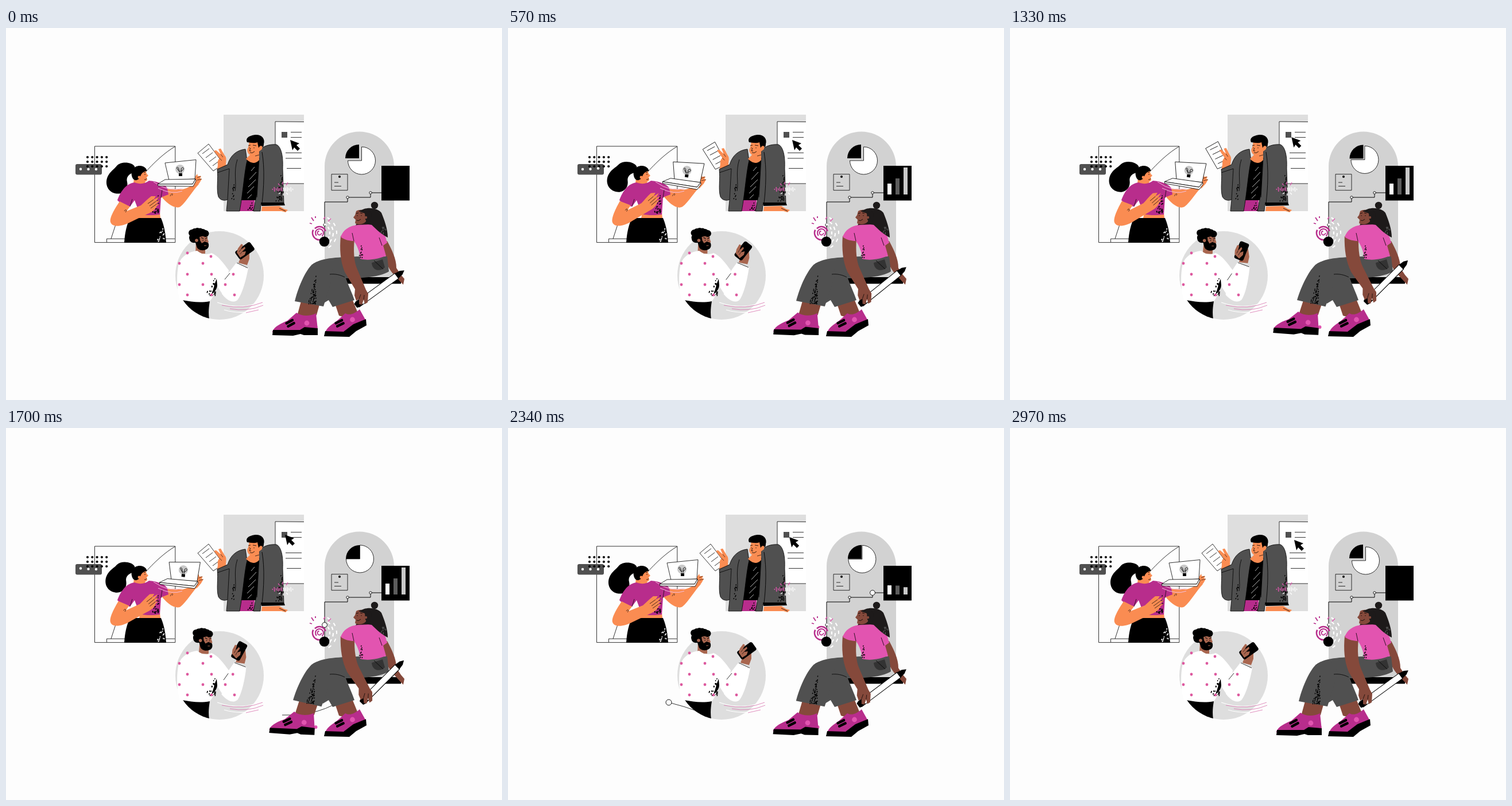
Animation, 864 px wide and 648 px high, one loop 3000 ms. Source, as an HTML page with a canvas:

```html
<!DOCTYPE html>
<html lang="en">
<head>
<meta charset="utf-8">
<title>Team at work</title>
<style>
html, body { margin: 0; width: 100%; height: 100%; overflow: hidden; background: #fdfdfd; }
canvas { display: block; width: 864px; height: 648px; }
</style>
</head>
<body>
<canvas id="stage" width="864" height="648"></canvas>
<script>
const ctx = document.getElementById('stage').getContext('2d');
const LOOP = 3000;
const BG = '#fdfdfd', GREY = '#d2d2d2', PALE = '#dedede', DARK = '#505050', INK = '#000', WHITE = '#fff';
const PLUM = '#b82d8c', PINK = '#e254b0', PEACH = '#fa8c52', TAN = '#a9664f', BROWN = '#85493b', HAIR = '#1d1a1a';
const paths = new Map();

function path(d) {
  if (!paths.has(d)) paths.set(d, new Path2D(d));
  return paths.get(d);
}
function fill(d, color) {
  ctx.fillStyle = color;
  ctx.fill(path(d));
}
function strokeWith(p, color, width) {
  ctx.strokeStyle = color;
  ctx.lineWidth = width;
  ctx.stroke(p);
}
function line(d, color = INK, width = 0.8) {
  strokeWith(path(d), color, width);
}
function shape(d, color, width = 0.8) {
  fill(d, color);
  line(d, INK, width);
}
// For outlines that change from frame to frame.
function freeShape(d, color, edge) {
  const p = new Path2D(d);
  ctx.fillStyle = color;
  ctx.fill(p);
  if (edge) strokeWith(p, INK, edge);
}
function dot(x, y, r, color, outline) {
  ctx.beginPath();
  ctx.arc(x, y, r, 0, 7);
  ctx.fillStyle = color;
  ctx.fill();
  if (outline) {
    ctx.strokeStyle = INK;
    ctx.lineWidth = 0.9;
    ctx.stroke();
  }
}
function rect(x, y, w, h, color) {
  ctx.fillStyle = color;
  ctx.fillRect(x, y, w, h);
}
function posed(dx, dy, deg, px, py, draw) {
  ctx.save();
  ctx.translate(px + dx, py + dy);
  ctx.rotate(deg * Math.PI / 180);
  ctx.translate(-px, -py);
  draw();
  ctx.restore();
}

const ease = x => x * x * (3 - 2 * x);
const ramp = (t, from, len) => Math.min(1, Math.max(0, (t - from) / len));
const upDown = (t, a, b, c, d) => ease(ramp(t, a, b - a)) - ease(ramp(t, c, d - c));
function bump(t, mid, half) {
  const d = Math.abs(t - mid);
  return d < half ? (1 + Math.cos(Math.PI * d / half)) / 2 : 0;
}

// Grains gather at the bottom right of a slanted strip.
function grains(x, y, w, h, n, lean, seed, color = INK) {
  ctx.fillStyle = color;
  for (let i = 0; i < n; i++) {
    seed = (seed * 16807) % 2147483647;
    const u = seed / 2147483647;
    seed = (seed * 16807) % 2147483647;
    const v = Math.sqrt(seed / 2147483647);
    ctx.beginPath();
    ctx.ellipse(x + w * (1 - u * v) + lean * v, y + h * v, 0.8, 1.2, 0.4, 0, 7);
    ctx.fill();
  }
}

// A stroke that runs in along its path and then runs out.
function runner(d, len, t, start, mid, end) {
  if (t <= start || t >= end) return;
  const head = ramp(t, start, mid - start) * len;
  const tail = ramp(t, mid + 40, end - mid - 40) * len;
  ctx.setLineDash([head - tail, len * 3]);
  ctx.lineDashOffset = -tail;
  line(d);
  ctx.setLineDash([]);
}

function threads(t) {
  runner('M505 223.5Q532 218 570 219.5', 67, t, 760, 930, 1140);
  const s = upDown(t, 2060, 2260, 2420, 2640);
  if (s > 0.01) {
    const x = 330 - 50 * s, y = 494 - 16 * s;
    strokeWith(new Path2D(`M${x} ${y}Q308 485 332 494`), INK, 0.8);
    dot(x, y, 5 * s, BG, true);
  }
}

function laptop() {
  shape('M277 235L331 229.5L329 263L284 265Z', WHITE);
  shape('M277 264L330 263L325 272L264 272Z', WHITE);
  shape('M264 272L325 272L330 263L331 266L326 276L265 275Z', WHITE);
  dot(303, 246, 8, '#c8c8c8');
  line('M303 252L299 246C295 243 300 240 301 246C302 252 306 250 305 245C309 240 312 247 306 248L305 252', INK, 0.9);
  rect(301, 253, 6, 5, INK);
}

function laptopWoman(t) {
  const k = upDown(t, 20, 500, 1450, 2100);
  line('M154.5 206H294.8V373.6H154.5ZM294.5 206.5C262 225 214 278 199 318L183 367M175.5 373V367.2H294');
  ctx.beginPath();
  ctx.roundRect(121, 237, 46, 18.5, 3);
  ctx.fillStyle = DARK;
  ctx.fill();
  for (let i = 0; i < 15; i++) dot(142 + i % 5 * 8.3, 225 + Math.floor(i / 5) * 8, 2.1, INK);
  for (let i = 0; i < 3; i++) {
    const lift = bump(t % 1500, 200 + i * 180, 260);
    dot(130 + i * 13.5, 246 - lift * 1.5, 2.2, WHITE);
  }

  posed(0, 0, 6 * k, 222, 244, () =>
    fill('M224 241C219 233 200 232 193 240C187 248 177 252 175 267C174 283 188 291 200 288C209 285 213 277 211 268C209 261 213 254 224 251Z', INK));
  fill('M216 331H270C276 345 278 360 279 374H206C207 355 211 341 216 331Z', INK);
  grains(258, 336, 14, 36, 18, 5, 41, WHITE);
  fill('M234 322H268L269 331H232Z', PEACH);

  posed(4 * k, 1 * k, 0, 0, 0, () => {
    fill('M328 271L326 264L333 254L334 258L340 258L338 262L341 263L337 270L329 279Z', PEACH);
    line('M333 261L339 258M333 265L341 263', INK, 0.6);
  });
  posed(0, 0, 1.5 * k, 293, 310, () => {
    fill('M270 288L282 280L307 281C316 279 324 275 328 269L336 272C326 282 314 303 304 311C294 317 279 304 270 293Z', PEACH);
    line('M286 293C288 287 292 288 289 292', INK, 0.6);
  });

  fill('M223 258L243 260L242 272L250 268L238 277L222 272Z', PEACH);
  fill('M224 269C209 271 200 284 194 300C201 307 208 310 216 311L224 300L233 324C245 327 258 326 268 325L270 295L283 290L281 279C276 271 262 267 249 266C242 271 234 273 224 269Z', PLUM);
  grains(252, 290, 14, 33, 32, 0, 17);
  line('M216 311L220 298M270 296L272 282', INK, 0.7);
  line('M257 268Q284 287 308 279M265 279Q290 291 307 284', '#f4bddd', 1);

  fill('M229 246L243 247L245 254L248 257L245 260L246 265C243 269 236 270 230 268L223 264Z', PEACH);
  fill('M219 257C217 246 225 240 233 240C241 240 246 246 245 249C239 250 235 254 234 259C229 268 221 267 219 257Z', INK);
  dot(232, 260, 2.4, PEACH);
  line('M240 252L243 251M241 255H243M241 264Q244 265 245 262', INK, 0.8);

  posed(0, 0, -5 * k, 190, 338, () => {
    fill('M198 302C190 314 180 330 182 338C185 348 202 346 217 338L246 324C255 321 261 315 262 311L267 306L261 307L268 300L261 302L267 294L257 299L261 293L253 293C246 298 241 304 235 309L210 319L216 311Z', PEACH);
    line('M257 299L247 306M261 302L250 310M262 307L252 314M206 319C208 315 212 317 208 321', INK, 0.7);
  });

  posed(5 * k, 1 * k, 9 * k, 298, 270, laptop);
}

function paper() {
  shape('M353 202L379 237L361 249L334 218Z', WHITE);
  for (let i = 0; i < 4; i++) {
    const x = 342 + i * 6, y = 219 + i * 7;
    line(`M${x} ${y}L${x + 12} ${y - 9}`);
  }
}

function burst() {
  for (let i = 0; i < 12; i++) {
    const x = 464 + i * 3.2, h = 1 + 3 * Math.abs(Math.sin(i * 1.7));
    line(`M${x} ${281 - h}L${x + 0.6} ${281 + h}`, i < 6 ? PINK : WHITE, 1.4);
  }
  line('M474 271L477 274M482 268V273M491 269L488 274', PINK, 1.3);
  line('M475 289L478 287M483 292V288M491 290L488 287', WHITE, 1.3);
}

function coatMan(t) {
  const k = bump(t, 970, 660);
  rect(379, 151, 140, 168, PALE);
  rect(469, 163, 50, 108, WHITE);
  line('M519 163.5L469 163V271H519M496 181.5H515M496 190.5H515M487 217.5H515M487 227H515M489 244.5H514');
  rect(480, 181, 10, 10, DARK);
  const c = upDown(t, 1050, 1600, 1800, 2950);
  posed(-9 * c, -9 * c, 0, 0, 0, () =>
    fill('M495 195L511 201L506 204L512 210L508 214L502 208L499 213Z', INK));

  posed(5 * k, -3 * k, 26 * k, 372, 238, paper);
  posed(2 * k, -2 * k, 7 * k, 376, 243, () => {
    fill('M368 247L369 238C368 232 370 229 372 227L362 214L366 213L374 220L370 211L374 210L381 222C385 226 383 232 383 238L388 243L374 252Z', PEACH);
    line('M372 227L376 231M374 220L378 225', INK, 0.6);
  });

  fill('M408 300H433L432 319H405Z', PLUM);
  grains(420, 301, 10, 17, 12, 0, 7);
  fill('M414 229L441 229L439 300H407Z', INK);
  line('M427 249L433 242M424 264L436 251M422 277L435 264M420 288L432 276M421 297L428 290', WHITE, 0.7);
  shape('M417 211C401 213 391 222 386 238L368 246C370 263 366 281 370 294C374 301 381 301 386 299L384 319H407C413 286 415 252 420 231Z', DARK);
  line('M368 252L389 245L386 299M403 229C396 250 402 270 399 284', INK, 0.8);
  grains(392, 258, 6, 42, 12, 0, 93);
  shape('M441 213C448 206 458 202 471 203C480 207 483 225 482 245L484 306L444 307L443 319H431L437 288Z', DARK);
  line('M446 216C451 245 449 280 446 305M441 226L437 295', INK, 0.9);
  grains(470, 244, 11, 58, 38, 0, 65);
  fill('M446 311L476 310L484 315L491 317L487 321L480 319H445Z', PEACH);
  fill('M444 304L484 304L486 309L445 310Z', INK);
  line('M476 314L487 319', INK, 0.8);
  burst();

  posed(0, 1, 0, 0, 0, () => {
    fill('M424 196L441 197L447 203L446 210L441 214L441 229C433 238 424 233 418 227L425 220C420 217 419 211 422 207Z', PEACH);
    fill('M420 198C416 189 427 186 434 185C445 184 452 192 449 201C449 206 447 208 446 205C443 203 441 206 440 208L438 198C431 201 424 198 420 198Z', INK);
    line('M422 204L426 203M430 203L436 204M424 207V208.5M432 207V208.5M426 208L424 213H427M425 216Q429 218 433 214', INK, 0.8);
    line('M441 220L434 222', INK, 0.7);
  });
}

function phoneMan(t) {
  const arm = upDown(t, 0, 1150, 1400, 2400);
  const head = upDown(t, 500, 950, 1800, 2300);
  dot(372, 431, 77, PALE);

  posed(6 * head, 0.5 * head, 2 * head, 341, 388, () => {
    fill('M331 370L347 377L347 393L330 393Z', TAN);
    fill('M333 361L350 360L351 367L353 373L350 375L349 380L333 380Z', TAN);
    for (let i = 0; i < 6; i++) dot(324 + i * 4.7, 357 - 3 * Math.sin(i * 0.7), 6, INK);
    dot(325, 365, 6, INK);
    fill('M320 364C318 371 323 375 330 374L332 380C333 386 341 389 348 386C354 384 354 377 352 374L346 372L341 375L338 370L337 364L349 361L344 355L322 353Z', INK);
    dot(332, 370, 2.8, TAN);
    line('M340 365L344 367M347 367L351 365M343 369V370.5M348 369V370.5', INK, 1);
    line('M345 379H349', TAN, 1);
  });

  fill('M333 388C317 390 306 398 301 410C296 432 298 460 303 475L309 477C325 481 343 481 354 478C360 469 365 460 368 450L380 468L388 422C379 410 369 396 358 392C348 396 340 394 333 388Z', WHITE);
  ctx.save();
  ctx.clip(path('M372 354A77 77 0 0 1 372 508A77 77 0 0 1 372 354Z'));
  fill('M307 474C323 477 339 479 355 476C353 488 352 500 355 512H307Z', INK);
  ctx.restore();
  grains(347, 434, 18, 32, 36, 0, 77);
  fill('M367 437C363 445 362 454 358 464C364 460 368 453 368 448Z', INK);

  posed(0, 0, -5 * arm, 395, 468, () => {
    fill('M380 436L402 408L422 418C418 440 411 464 403 474C395 480 385 475 376 463Z', WHITE);
    line('M381 438L390 427M402 409L421 418', INK, 0.8);
  });
  const pts = [[316, 392], [357, 398], [302, 410], [343, 410], [316, 429], [358, 429], [302, 447], [343, 447], [382, 447], [316, 465], [358, 465], [398, 465]];
  for (const [x, y] of pts) dot(x, y, 2.4, '#dd5a9f');
  dot(396 - arm, 429, 2.4, '#dd5a9f');

  posed(-6 * arm, -2 * arm, -8 * arm, 412, 410, () =>
    fill('M405 409L409 399L402 390L407 382L416 390L424 388L424 402L420 413Z', TAN));
  posed(-12.5 * arm, 0.5 * arm, -33 * arm, 416, 388, () => {
    ctx.save();
    ctx.translate(416, 388);
    ctx.rotate(-0.62);
    ctx.beginPath();
    ctx.roundRect(-16, -8.5, 32, 17, 3.5);
    ctx.fillStyle = INK;
    ctx.fill();
    ctx.restore();
  });
  posed(-9 * arm, 1 * arm, -12 * arm, 412, 400, () => {
    fill('M408 400L402 391L404 384L410 376L413 378L409 386L416 381L417 384L411 390L418 389L416 395Z', TAN);
    line('M409 386L406 390M411 390L408 394', INK, 0.6);
  });

  line('M368 478Q410 493 448 475M380 491Q414 501 447 488', WHITE, 1.1);
  line('M376 483Q415 491 447 478M390 489Q420 495 448 483M418 496L440 491', '#d772ac', 0.8);
}

function board(t) {
  fill('M555 440V241A60.5 60.5 0 0 1 676 241V440Z', GREY);
  runner('M592 468Q550 502 481 500', 120, t, 1440, 1690, 1980);
  const p = upDown(t, 1050, 1600, 2250, 2650);
  const x = 619.5 - 3 * p, y = 231 - 3 * p;
  freeShape(`M${x} ${y}V${y - 24}A24 24 0 1 1 ${x - 24} ${y}Z`, WHITE, 0.8);
  const q = 615 + p, r = 227 + p;
  freeShape(`M${q} ${r}V${r - 24}A24 24 0 0 0 ${q - 24} ${r}Z`, INK);

  line('M567 254.7H595V282.7H567ZM572 269H579M572 275.5H584');
  dot(581, 259, 2, INK);
  line('M555 364V303H595V295H635V287H654', INK, 1);
  const nodes = [[555, 343], [595, 295], [635, 287]];
  nodes.forEach(([nx, ny], i) => dot(nx, ny, 2.2 + 2.2 * bump(t, 1720 + i * 310, 310), WHITE, true));

  rect(654, 240, 49, 60.5, INK);
  [WHITE, '#5c5c5c', '#c9c9c9'].forEach((color, i) => {
    const full = [19, 28, 47][i];
    const h = full * (ease(ramp(t, 60 + i * 70, 300)) - ramp(t, 2292 - i * 85, 300));
    rect(661 + i * 14, 290 - h, 7, h, color);
  });
}

function swirl() {
  const arc = (r, a, b, color, w) => {
    ctx.beginPath();
    ctx.arc(546, 357, r, a, b);
    ctx.strokeStyle = color;
    ctx.lineWidth = w;
    ctx.stroke();
  };
  arc(12, 1.2, 3.6, PLUM, 2.6);
  arc(11, 3.9, 6, PLUM, 2.6);
  arc(7, 2.4, 7.2, PLUM, 2);
  arc(3.5, 0, 4.6, PLUM, 1.8);
  for (let i = 0; i < 5; i++) {
    const a = -1.1 + i * 0.48;
    arc(18, a, a + 0.28, WHITE, 2.2);
    arc(24, a + 0.15, a + 0.4, WHITE, 2.2);
    arc(30, a, a + 0.2, WHITE, 2);
  }
  line('M532 330L536 336M529 340L533 341M539 328V331', PLUM, 1.8);
  line('M561 337L566 332M553 333L556 329', PINK, 1.4);
  dot(554.5, 372, 8.8, INK);
}

function shoe(upper, sole, x, y, tilt, cx, cy) {
  fill(upper, PLUM);
  fill(sole, INK);
  posed(0, 0, tilt, x, y, () => {
    ctx.beginPath();
    ctx.roundRect(x - 8, y - 5, 16, 4.5, 2);
    ctx.roundRect(x - 8, y + 1, 16, 4.5, 2);
    ctx.fillStyle = INK;
    ctx.fill();
  });
  dot(cx, cy, 4.4, PINK);
}

function pen() {
  ctx.save();
  ctx.translate(609, 484);
  ctx.rotate(-0.63);
  shape('M4 -5.5H89V5.5H4Z', WHITE, 1);
  fill('M0 -4Q1 -6 12 -5.5V5.5Q1 6 0 4Z', INK);
  fill('M88 -5.5L98 -4L105 0L98 4L88 5.5Z', INK);
  ctx.restore();
}

function penWoman(t) {
  const leg = (1 - Math.cos(2 * Math.PI * t / LOOP)) / 2;
  const hand = upDown(t, 350, 950, 1700, 2500);

  fill('M573 480L603 472L612 494C604 501 590 505 580 501Z', BROWN);
  shoe('M556 530C560 519 573 514 580 507L591 497C600 502 609 496 616 490L626 508L601 524L590 530Z',
    'M556 528L588 529L605 516L627 507L628 518L610 528L598 538L554 537Z', 581, 514, -26, 603.5, 508);
  dot(539.5, 521, 3, PINK);
  posed(0, 0, 2.8 * leg, 545, 412, () => {
    fill('M514 476L546 482L541 500C530 507 516 504 508 498Z', BROWN);
    shoe('M464 529C467 520 480 514 490 510L506 496C516 503 530 502 540 497L543 525L464 530Z',
      'M465 526L512 526L520 521L543 523V535H519L513 533L500 536L464 535Z', 495, 514, -28, 524, 514);
  });

  rect(590, 434, 98, 11.5, INK);
  fill('M655 377L664 371C672 386 680 402 680 418L688 430L694 437L692 447L687 442L677 431C667 421 662 410 661 397Z', BROWN);
  fill('M532 413C550 398 585 400 612 398L664 398L667 424C655 432 630 436 592 436C597 450 603 462 607 474L569 486L562 474L552 480L530 430Z', DARK);
  posed(0, 0, 2.8 * leg, 545, 412, () => {
    fill('M503 476C508 455 519 427 532 413C544 403 557 404 567 412L570 430L553 485Z', DARK);
    grains(526, 430, 14, 51, 60, 0, 29);
  });
  line('M590 434C582 430 574 428 564 429', INK, 0.8);
  fill('M637 409L656 403L660 417C650 426 638 422 637 409Z', '#333');
  line('M641 405L657 420', INK, 0.8);

  posed(10 * hand, -5 * hand, -9 * hand, 609, 484, pen);
  posed(0, 0, -4.2 * hand, 594, 366, () => {
    fill('M583 362L607 368C605 388 606 405 611 418L627 456L631 463L630 478L625 481L623 473L620 482L615 481L615 472L610 475L607 466L608 455L590 425C582 405 581 385 583 362Z', BROWN);
    line('M615 472L618 464M623 473L624 465', INK, 0.7);
  });

  fill('M613 335L630 335L637 344L624 348L609 344Z', '#2c1b19');
  fill('M583 364C587 352 598 344 613 343L637 342C652 344 660 356 664 374L657 379L662 397C648 402 632 406 617 402C616 388 611 378 606 371C598 371 590 369 583 364Z', PINK);
  grains(612, 376, 7, 24, 12, 3, 85);
  line('M606 371L603 357M655 379L650 365', INK, 0.8);

  dot(642, 309, 6.2, HAIR);
  fill('M616 320C624 311 646 312 654 322C659 334 665 350 665 365C655 360 645 351 637 343L625 341Z', HAIR);
  grains(645, 340, 14, 20, 12, 4, 33, '#555');
  fill('M610 319C616 315 625 317 628 321L627 337C622 343 612 343 608 340L609 334L605 330L608 326Z', BROWN);
  fill('M614 319C624 313 637 317 637 326L633 342L626 334L625 323Z', HAIR);
  dot(627, 330, 2.2, BROWN);
  line('M610 323L614 322M617 322L621 323M612 326V327.5M619 326V327.5M611 335Q614 337 618 333', INK, 0.8);
}

function frame(now) {
  const t = now % LOOP;
  rect(0, 0, 864, 648, BG);
  ctx.lineJoin = 'round';
  threads(t);
  laptopWoman(t);
  coatMan(t);
  phoneMan(t);
  board(t);
  swirl();
  penWoman(t);
}

const begin = performance.now();
function tick() {
  frame(performance.now() - begin);
  requestAnimationFrame(tick);
}
tick();
</script>
</body>
</html>
```
